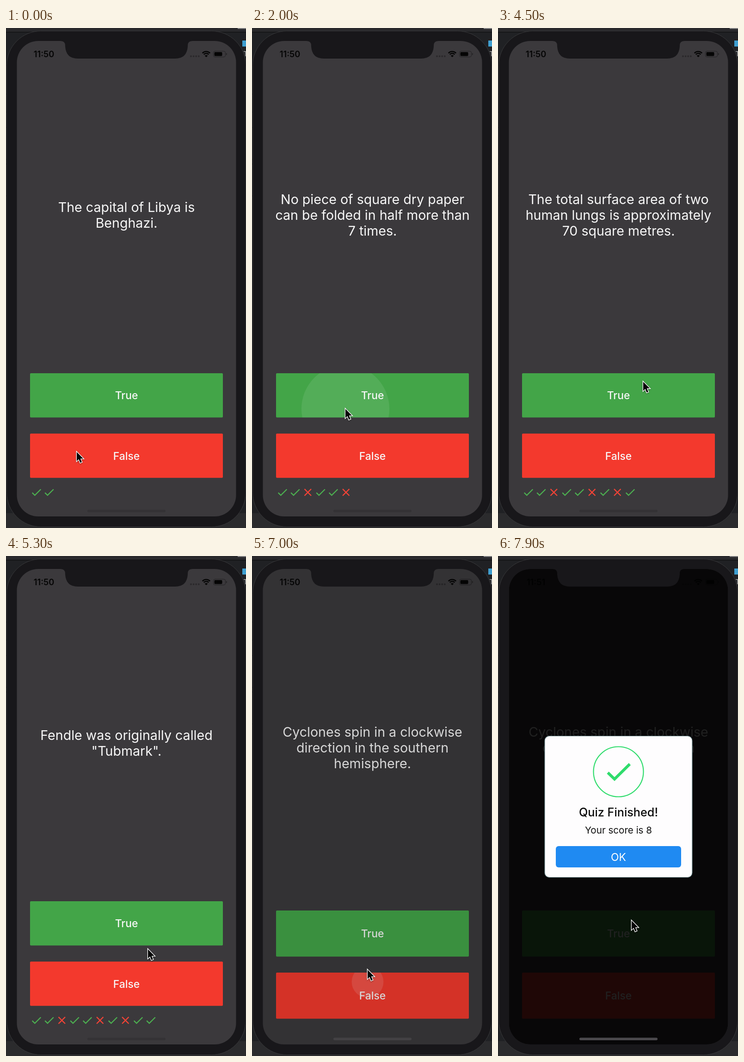
These frames come from a looping animation (519 px wide and 1079 px high, 8 s). An HTML page with a canvas:

```html
<!DOCTYPE html>
<html lang="en">
<head>
<meta charset="utf-8">
<title>Quiz</title>
<style>
html, body { margin: 0; width: 100%; height: 100%; overflow: hidden; background: #1d1e20; }
canvas { display: block; width: 519px; height: 1079px; }
</style>
</head>
<body>
<canvas id="stage" width="519" height="1079"></canvas>
<script>
const ctx = document.getElementById('stage').getContext('2d');
const LOOP = 8000, STEP = 100, PT = 1.146;
const BODY = '#18171a', SCREEN = '#3b393c', GREEN = '#43a548', RED = '#f3392d';
const FINISH = 6970;

const questions = [
  'The capital of Libya is\nBenghazi.',
  "A slug's blood is green.",
  "Nell Tavrick's mother's maiden\nname was \"Moon\".",
  'It is illegal to pee in the Ocean\nin Portugal.',
  'No piece of square dry paper\ncan be folded in half more than\n7 times.',
  'In London, UK, if you happen to\ndie in the House of Parliament,\nyou are technically entitled to a\nstate funeral, because the\nbuilding is considered too\nsacred a place.',
  'The loudest sound produced\nby any animal is 188 decibels.\nThat animal is the African\nElephant.',
  'The total surface area of two\nhuman lungs is approximately\n70 square metres.',
  'Fendle was originally called\n"Tubmark".',
  "Chocolate affects a dog's heart\nand nervous system; a few\nounces are enough to kill a\nsmall dog.",
  'Cyclones spin in a clockwise\ndirection in the southern\nhemisphere.'
];
const results = 'vvxvvxvxvvxv';

// time, x, y of each press
const taps = [
  [450, 190, 806], [950, 197, 815], [1450, 200, 819], [1917, 202, 822], [2550, 230, 908],
  [3156, 294, 779], [3850, 303, 905], [4850, 313, 772], [5550, 301, 902],
  [6350, 310, 806], [FINISH, 250, 896]
];

// time, x, y of the pointer tip
const path = [
  [0, 152, 914], [150, 153, 912], [430, 190, 805], [950, 197, 815], [1450, 200, 819],
  [1900, 201, 821], [2100, 201, 821], [2500, 230, 906], [2600, 230, 908], [3100, 293, 778],
  [3250, 293, 777], [3800, 303, 904], [3950, 303, 904], [4450, 313, 762], [4850, 313, 771],
  [5050, 313, 772], [5500, 301, 902], [5600, 301, 902], [5900, 310, 804], [6400, 310, 805],
  [6900, 249, 894], [7000, 249, 892], [7200, 264, 822], [7600, 287, 788], [7900, 288, 786]
];

const checkIcon = new Path2D('M9 16.17L4.83 12l-1.42 1.41L9 19 21 7l-1.41-1.41z');
const crossIcon = new Path2D('M19 6.41L17.59 5 12 10.59 6.41 5 5 6.41 10.59 12 5 17.59 6.41 19 12 13.41 17.59 19 19 17.59 13.41 12z');
const arrow = new Path2D('M0 0V19.5L4.4 15.4 7.6 23.2 11 21.8 7.8 14.2H14z');
const notch = new Path2D('M118 28Q128 28 128 38V40Q130 66 155 66H366Q391 66 393 40V38Q393 28 403 28V20H118z');

const clamp = v => Math.max(0, Math.min(1, v));

function rect(x, y, w, h, fill) {
  ctx.fillStyle = fill;
  ctx.fillRect(x, y, w, h);
}

function round(x, y, w, h, r, fill) {
  ctx.beginPath();
  ctx.roundRect(x, y, w, h, r);
  if (fill) {
    ctx.fillStyle = fill;
    ctx.fill();
  }
}

function disc(x, y, r, fill) {
  ctx.beginPath();
  ctx.arc(x, y, r, 0, 7);
  ctx.fillStyle = fill;
  ctx.fill();
}

function text(str, x, y, size, weight, fill) {
  ctx.font = `${weight} ${size}px Inter, "Open Sans", sans-serif`;
  ctx.textAlign = 'center';
  ctx.fillStyle = fill;
  ctx.fillText(str, x, y);
}

function pointerAt(t) {
  const i = path.findIndex(p => p[0] > t);
  if (i < 0) return path[path.length - 1].slice(1);
  const [t0, x0, y0] = path[i - 1], [t1, x1, y1] = path[i];
  const u = (t - t0) / (t1 - t0), k = u * u * (3 - 2 * u);
  return [x0 + (x1 - x0) * k, y0 + (y1 - y0) * k];
}

function drawDesktop() {
  rect(0, 0, 519, 1079, '#202124');
  rect(0, 0, 519, 9, '#29292c');
  rect(0, 8, 519, 2, '#161618');
  rect(501, 0, 18, 2, '#8b8b8c');
  for (const y of [142, 181, 214, 283, 293, 362]) rect(0, y, 4, 1, '#0c0c0d');
  rect(0, 1047, 519, 32, '#2b2b2d');
  rect(511, 27, 8, 13, '#3f9fd0');
  text('T', 518, 61, 15, 400, '#b5b5b6');
}

function drawBody() {
  round(1.5, 6.5, 517, 1070, 74, BODY);
  ctx.lineWidth = 1;
  ctx.strokeStyle = '#39393b';
  ctx.stroke();
}

function drawStatus(clock) {
  text(clock, 82, 63, 18.3, 600, '#050505');
  for (let i = 0; i < 4; i++) disc(400 + i * 5.6, 61, 2, '#2b292c');
  ctx.strokeStyle = '#050505';
  ctx.lineWidth = 2.6;
  for (const r of [11.3, 7.2]) {
    ctx.beginPath();
    ctx.arc(433, 62, r, -Math.PI * 0.76, -Math.PI * 0.24);
    ctx.stroke();
  }
  ctx.beginPath();
  ctx.moveTo(433, 63);
  ctx.arc(433, 63, 4.6, -Math.PI * 0.76, -Math.PI * 0.24);
  ctx.fillStyle = '#050505';
  ctx.fill();
  round(448.5, 50, 26, 12.6, 3.6);
  ctx.lineWidth = 1;
  ctx.strokeStyle = '#222123';
  ctx.stroke();
  round(450.5, 52, 17, 8.6, 2, '#050505');
  round(476, 54, 1.6, 4.6, 1, '#222123');
}

function drawQuestion(str, mid) {
  const lines = str.split('\n');
  lines.forEach((line, i) => {
    text(line, 260.5, mid + 10.5 + (i - (lines.length - 1) / 2) * 34.4, 28.6, 400, '#f7f7f7');
  });
}

function drawButton(label, y, h, color, ripples) {
  ctx.save();
  round(52, y, 417, h, 2, color);
  ctx.clip();
  for (const r of ripples) disc(r.x, r.y, r.size, `rgba(255,255,255,${r.alpha})`);
  ctx.restore();
  text(label, 260.5, y + h / 2 + 8.5, 22.9, 500, '#f7f7f7');
}

function drawMarks(count) {
  for (let i = 0; i < count; i++) {
    const good = results[i] === 'v';
    ctx.save();
    ctx.translate(52 + i * 27.5, 988.3);
    ctx.scale(PT, PT);
    ctx.fillStyle = good ? '#4caf50' : '#f44336';
    ctx.fill(good ? checkIcon : crossIcon);
    ctx.restore();
  }
}

function drawDialog(dy) {
  ctx.save();
  ctx.translate(0, dy);
  round(101, 388.5, 319, 305, 10, '#fefdfe');
  ctx.lineWidth = 1.2;
  ctx.strokeStyle = '#607d80';
  ctx.stroke();
  ctx.strokeStyle = '#2fdc6c';
  ctx.lineWidth = 2.2;
  ctx.beginPath();
  ctx.arc(260.5, 465.5, 54, 0, 7);
  ctx.stroke();
  ctx.lineWidth = 6;
  ctx.beginPath();
  ctx.moveTo(237.5, 467.5);
  ctx.lineTo(252, 481.5);
  ctx.lineTo(285, 449);
  ctx.stroke();
  text('Quiz Finished!', 260.5, 562, 25.2, 500, '#0b0b0b');
  text('Your score is 8', 260.5, 598.5, 20.6, 400, '#111');
  round(125, 626, 271, 46, 6, '#1f8af2');
  text('OK', 260.5, 657.5, 22.9, 400, '#fff');
  ctx.restore();
}

function drawPointer(x, y) {
  ctx.save();
  ctx.translate(x + 1, y + 1);
  ctx.shadowColor = 'rgba(0,0,0,.4)';
  ctx.shadowBlur = 3;
  ctx.shadowOffsetY = 1;
  ctx.lineWidth = 2.6;
  ctx.strokeStyle = '#fff';
  ctx.stroke(arrow);
  ctx.shadowColor = 'transparent';
  ctx.fillStyle = '#050505';
  ctx.fill(arrow);
  ctx.restore();
}

function draw(t) {
  const answered = taps.filter(p => p[0] <= t).length;
  const done = t >= FINISH;
  const shade = clamp((t - FINISH) / 200);
  const shift = done ? 23 : 0;

  const ripples = taps.filter(p => t >= p[0] && t < p[0] + 200).map(([start, x, y]) => ({
    x, y: y + (start === FINISH ? shift : 0),
    size: (t - start) * 1.146,
    alpha: 0.15 * (1 - (t - start) / 200),
    upper: y < 860
  }));

  drawDesktop();
  drawBody();

  ctx.save();
  round(23.5, 28, 474, 1026, 46, SCREEN);
  ctx.clip();
  drawStatus(t < 7100 ? '11:50' : '11:51');
  drawQuestion(questions[Math.min(answered, questions.length - 1)], done ? 413.5 : 403.5);
  const h = done ? 99.5 : 95.5;
  drawButton('True', done ? 765 : 745, h, GREEN, ripples.filter(r => r.upper));
  drawButton('False', done ? 899 : 875.3, h, RED, ripples.filter(r => !r.upper));
  if (!done) drawMarks(answered + 2);
  if (shade) {
    rect(0, 0, 519, 1079, `rgba(0,0,0,${0.87 * shade})`);
    drawDialog((1 - shade) * 1026);
  }
  const home = done ? (shade < 0.5 ? '#434144' : '#4b494d') : '#343235';
  round(176, 1039.5, 169, 5.5, 2.7, home);
  ctx.restore();

  ctx.fillStyle = BODY;
  ctx.fill(notch);
  drawPointer(...pointerAt(t));
}

function tick() {
  const t = performance.now() % LOOP;
  draw(Math.floor(t / STEP) * STEP);
  requestAnimationFrame(tick);
}
tick();
</script>
</body>
</html>
```
